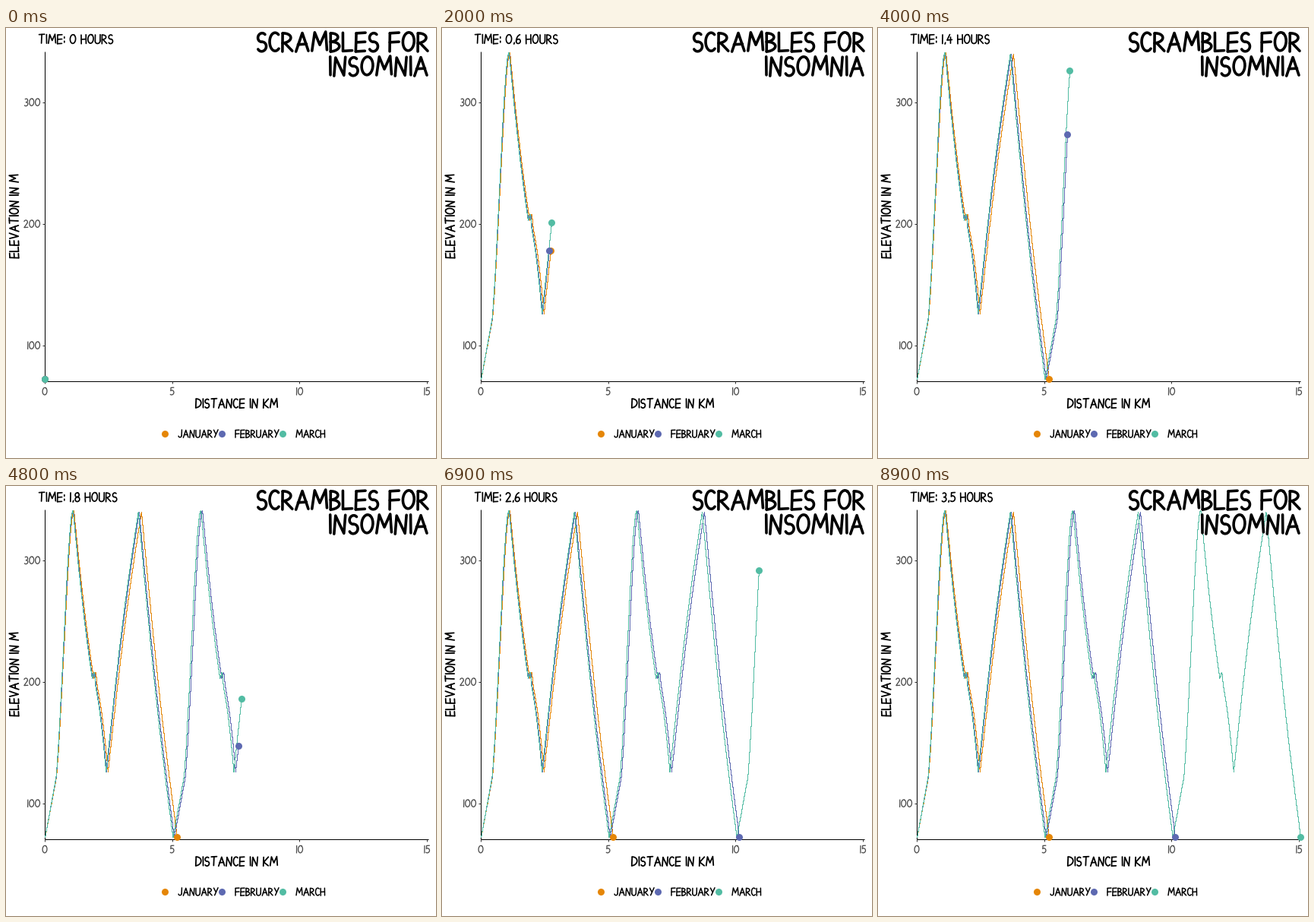
Animation, 566 px wide and 566 px high, one loop 10000 ms. Source, as a matplotlib script:

```python
import random

import numpy as np
import matplotlib.pyplot as plt
from matplotlib.animation import FuncAnimation
from matplotlib.collections import LineCollection

SIZE, DPI = 566, 64
PX = 72 / DPI  # points per pixel
FRAMES, INTERVAL = 100, 100
HOLD, STEPS, HOURS = 5, 84, 3.46
LEFT, BOTTOM, KM = 51, 465, 33.53  # KM: pixels per km
GREY = "#4D4D4D"

# Per runner: colour, legend x, lap length in km, steps taken by each lap.
RUNNERS = {
    "JANUARY": ("#E58606", 209, 5.19, [27]),
    "FEBRUARY": ("#5D69B1", 284, 5.07, [27, 29.5]),
    "MARCH": ("#52BCA3", 364, 5.02, [25.5, 29.5, 29]),
}

# Turning points of a lap: share of distance, height, share of time, and
# how much later each one comes with every further lap.
PLACE = np.array([0, .218, .367, .476, .729, 1])
HEIGHT = [72, 341, 203, 126, 340, 72]
CLOCK = np.array([0, .33, .43, .485, .826, 1])
FATIGUE = np.array([0, .03, .03, .03, .015, 0])


def steepen(u):
    v = u**1.4
    return np.maximum(.47 * u, v * v * (3 - 2 * v))


def bow(u):
    return u + .06 * np.sin(np.pi * u)


def dip(u):
    return u**1.7 - .1 * np.exp(-((u - .15) / .08)**2)


SLOPES = [steepen, bow, dip, bow, bow]


def line(*xy):
    return np.reshape(xy, (-1, 2)).astype(float)


def arc(cx, cy, rx, ry, start, end):
    t = np.radians(np.linspace(start, end, 24))
    return np.column_stack([cx + rx * np.cos(t), cy + ry * np.sin(t)])


def stem(x=0):
    return line(x, 0, x, 1)


def bar(y, a=0, b=.5):
    return line(a, y, b, y)


def bowl(low, high, width):
    return arc(0, (low + high) / 2, width, (high - low) / 2, 90, -90)


def ring(low, high, r):
    return arc(r, (low + high) / 2, r, (high - low) / 2, 60, 420)


# Hand lettering with letters one unit high.
GLYPHS = {
    "A": [line(0, 0, .36, 1, .68, 0), bar(.38, .12, .58)],
    "B": [stem(), bowl(.53, 1, .4), bowl(0, .53, .48)],
    "C": [arc(.3, .5, .3, .5, 50, 310)],
    "D": [stem(), bowl(0, 1, .58)],
    "E": [stem(), bar(0), bar(.5), bar(1)],
    "F": [stem(), bar(.5), bar(1)],
    "H": [stem(), stem(.54), bar(.5, 0, .54)],
    "I": [stem(.04)],
    "J": [line(.42, 1, .42, .22), arc(.21, .22, .21, .22, 0, -170)],
    "K": [stem(), line(.54, 1, .03, .44, .56, 0)],
    "L": [stem(), bar(0)],
    "M": [line(0, 0, .12, 1, .42, .3, .72, 1, .82, 0)],
    "N": [line(0, 0, .04, 1, .54, 0, .58, 1)],
    "O": [ring(0, 1, .31)],
    "R": [stem(), bowl(.46, 1, .45), line(.12, .46, .54, 0)],
    "S": [arc(.24, .76, .22, .24, 40, 270), arc(.24, .26, .24, .26, 90, -150)],
    "T": [stem(.31), bar(1, 0, .62)],
    "U": [line(0, 1, 0, .28), arc(.28, .28, .28, .28, 180, 360), line(.56, .28, .56, 1)],
    "V": [line(0, 1, .29, 0, .6, 1)],
    "Y": [line(0, 1, .28, .48), line(.58, 1, .16, 0)],
    "0": [ring(0, 1, .31)],
    "1": [stem(.04)],
    "2": [arc(.24, .74, .24, .26, 160, -35), line(.44, .59, 0, 0, .52, 0)],
    "3": [arc(.2, .76, .22, .24, 130, -90), arc(.2, .26, .26, .26, 90, -140)],
    "4": [line(.32, 1, 0, .38, .56, .4), line(.4, .7, .38, 0)],
    "5": [line(.48, 1, .08, 1, .06, .56), arc(.18, .32, .3, .32, 110, -130)],
    "6": [ring(0, .5, .24), arc(.5, .25, .5, .75, 180, 100)],
    "7": [line(0, 1, .5, 1, .18, 0)],
    "8": [ring(.52, 1, .22), ring(0, .52, .25)],
    "9": [ring(.46, 1, .23), line(.46, .73, .38, 0)],
    ":": [line(.06, .12, .06, .26), line(.06, .6, .06, .74)],
    ".": [line(.12, .1, .07, -.06)],
    " ": [],
}
GAP, SPACE, TILT = .2, .25, .06


def by_hand(strokes, rng):
    """Give a glyph its own slight lean and lift, with rising bars."""
    lean, lift = rng.uniform(-.03, .05), rng.uniform(-.03, .03)
    return [np.column_stack([s[:, 0] + lean * s[:, 1], s[:, 1] + TILT * s[:, 0] + lift])
            for s in strokes]


rng = random.Random(4)
GLYPHS = {ch: by_hand(strokes, rng) for ch, strokes in GLYPHS.items()}


def lettering(text, x, y, h, align=0, upright=False):
    """Strokes of a text; align is the share of its width left of the anchor."""
    strokes, pen = [], 0
    for ch in text:
        strokes += [s + (pen, 0) for s in GLYPHS[ch]]
        pen += max((s[:, 0].max() for s in GLYPHS[ch]), default=SPACE) + GAP
    shift = align * (pen - GAP)
    if upright:
        return [np.column_stack([x - s[:, 1] * h, y - (s[:, 0] - shift) * h]) for s in strokes]
    return [np.column_stack([x + (s[:, 0] - shift) * h, y - s[:, 1] * h]) for s in strokes]


def write(text, x, y, h, width, color="black", **kw):
    ink = LineCollection(lettering(text, x, y, h, **kw), colors=color, linewidths=width * PX,
                         capstyle="round", joinstyle="round", zorder=5)
    return ax.add_collection(ink, autolim=False)


def rule(x, y, color="black"):
    ax.plot(x, y, color=color, lw=PX, solid_capstyle="butt", snap=True, zorder=1)


def dot(x, y, color):
    return ax.plot([x], [y], "o", ms=9 * PX, mew=0, color=color, zorder=4)[0]


def height_to_y(metres):
    return 97.5 + (300 - metres) * 1.6


def plan(lap_km, laps):
    """Return the route on the stage and the (step, x) schedule."""
    u = np.linspace(0, 1, 300)
    route, schedule = [], []
    for lap, steps in enumerate(laps):
        xs = LEFT + (lap + PLACE) * lap_km * KM
        times = sum(laps[:lap]) + steps * (CLOCK + lap * FATIGUE)
        schedule.append([times, xs])
        for i, slope in enumerate(SLOPES):
            metres = HEIGHT[i] + (HEIGHT[i + 1] - HEIGHT[i]) * slope(u)
            route.append([xs[i] + (xs[i + 1] - xs[i]) * u, height_to_y(metres)])
    return np.hstack(route), np.hstack(schedule)


fig = plt.figure(figsize=(SIZE / DPI, SIZE / DPI), dpi=DPI, facecolor="white")
ax = fig.add_axes([0, 0, 1, 1])
ax.set_xlim(0, SIZE)
ax.set_ylim(SIZE, 0)
ax.axis("off")

rule([LEFT, LEFT], [31, BOTTOM])
rule([LEFT, 556], [BOTTOM, BOTTOM])
for metres in (100, 200, 300):
    y = height_to_y(metres)
    rule([LEFT - 3, LEFT], [y, y], "#333333")
    write(str(metres), 44.5, y + 5, 9.5, 1.3, GREY, align=1)
for km in (0, 5, 10, 15):
    x = LEFT + km * KM
    rule([x, x], [BOTTOM, BOTTOM + 3], "#333333")
    write(str(km), x, 483, 9.5, 1.3, GREY, align=.5)

write("SCRAMBLES FOR", 555, 30.5, 24, 3.6, align=1)
write("INSOMNIA", 554, 62.5, 24, 3.6, align=1)
write("DISTANCE IN KM", 303.5, 500, 11.6, 1.8, align=.5)
write("ELEVATION IN M", 16.5, 248, 11.6, 1.8, align=.5, upright=True)
clock = write("TIME: 0 HOURS", 43, 20.5, 11.6, 1.7)

tracks = []
for name, (color, key_x, lap_km, laps) in RUNNERS.items():
    dot(key_x, 534, color)
    write(name, key_x + 18, 539, 9.7, 1.5)
    # Whole-pixel steps keep the trail crisp and one pixel wide.
    trail, = ax.plot([], [], color=color, lw=PX, drawstyle="steps-post", snap=True, zorder=3)
    tracks.append((trail, dot(LEFT, BOTTOM, color), *plan(lap_km, laps)))


def update(frame):
    step = min(max(frame - HOLD, 0), STEPS)
    hours = round(HOURS * step / STEPS, 1)
    clock.set_segments(lettering(f"TIME: {hours:g} HOURS", 43, 20.5, 11.6))
    for trail, marker, route, schedule in tracks:
        x = np.interp(step, *schedule)
        trail.set_data(*np.rint(route[:, route[0] <= x]))
        marker.set_data([x], [np.interp(x, *route)])
    return [clock] + [artist for track in tracks for artist in track[:2]]


anim = FuncAnimation(fig, update, frames=FRAMES, interval=INTERVAL, repeat=True,
                     repeat_delay=0, blit=False)
plt.show()
```
